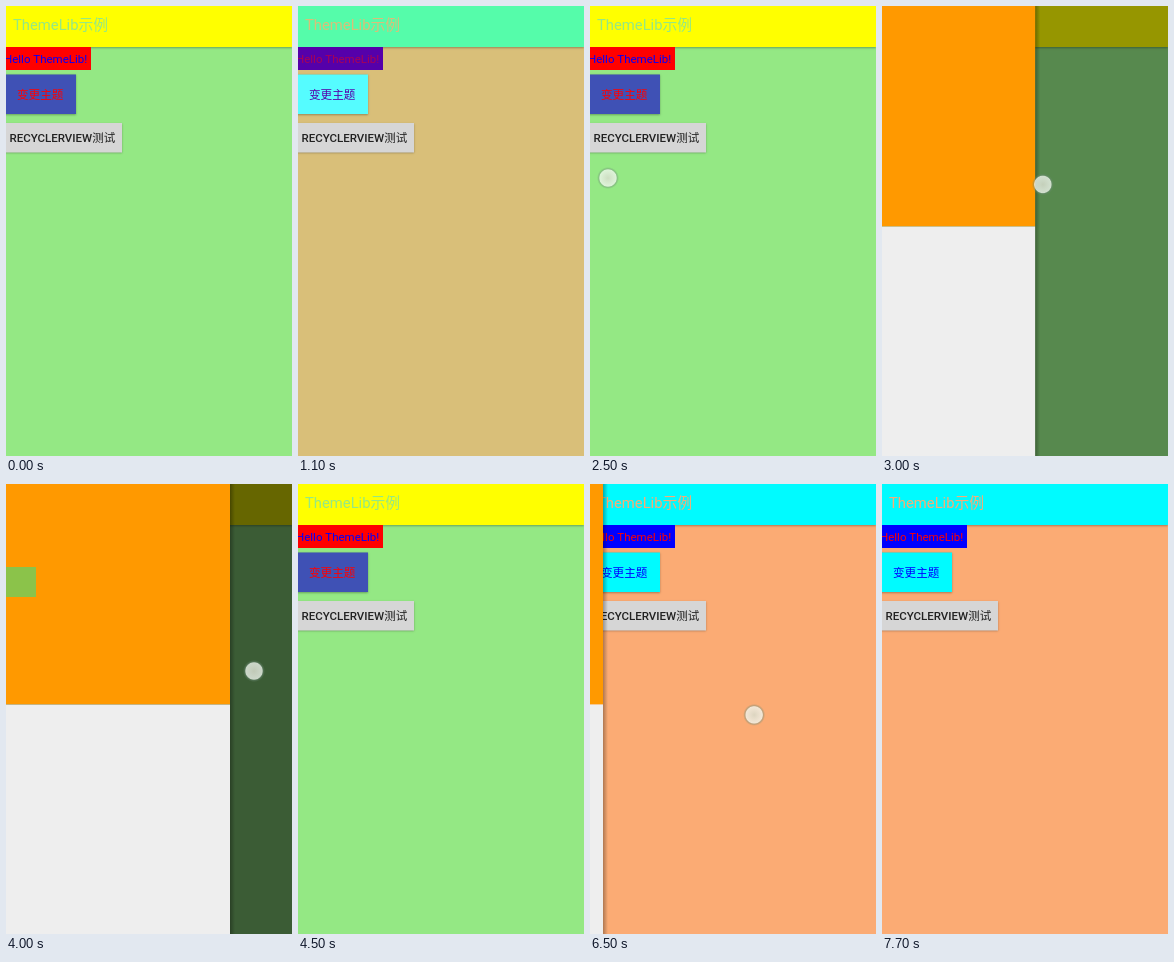
An HTML page with a canvas that plays this animation: 286 px wide and 450 px high, repeating every 8 s.

```html
<!DOCTYPE html>
<html lang="zh">
<head>
<meta charset="utf-8">
<title>ThemeLib</title>
<style>
  html, body { margin: 0; width: 100%; height: 100%; overflow: hidden; }
  canvas { display: block; }
</style>
</head>
<body>
<canvas width="286" height="450"></canvas>
<script>
const ctx = document.querySelector('canvas').getContext('2d');
const W = 286, H = 450, LOOP = 8000, STEP = 100, FADE = 300;
const FONT = 'Roboto, "Noto Sans CJK SC", "Noto Sans CJK", sans-serif';
const RED = '#ff0000', BLUE = '#0000ff';

const green = { bar: '#ffff00', page: '#94e884', label: RED, text: BLUE, button: '#3f51b5' };
const salmon = { bar: '#00fbff', page: '#fbab74', label: BLUE, text: RED, button: '#00fbff' };

// A tap on the theme button, then a fade to the next theme.
const changes = [
  { tap: 700, start: 900, from: green, to: salmon },
  { tap: 1600, start: 1700, from: salmon, to: green },
  { tap: 4900, start: 5100, from: green, to: salmon }
];

const hold = (start, end, x, y) => ({ start, arrive: start + STEP, end, from: [x, y], to: [x, y] });
const touches = [
  ...changes.map(c => hold(c.tap, c.start, 38, 90)),
  { start: 2500, arrive: 3400, end: 3700, from: [18, 172], to: [263, 183] },
  hold(4000, 4100, 248, 187),
  { start: 5900, arrive: 6800, end: 6900, from: [16, 222], to: [216, 234] },
  { start: 7000, arrive: 7200, end: 7500, from: [216, 234], to: [258, 270] }
];

const drawerMoves = [
  { open: 2500, opened: 3300, close: 4100, closed: 4500, width: 224 },
  { open: 5900, opened: 6100, close: 7400, closed: 7700, width: 13 }
];

const mix = (a, b, p) => a + (b - a) * p;
const progress = (t, a, b) => Math.min(1, Math.max(0, (t - a) / (b - a)));
const ease = p => p * p * (3 - 2 * p);

function mixColor(a, b, p) {
  const channel = (hex, i) => parseInt(hex.slice(i, i + 2), 16);
  return `rgb(${[1, 3, 5].map(i => Math.round(mix(channel(a, i), channel(b, i), p)))})`;
}

function themeAt(t) {
  const change = changes.filter(c => t > c.start).pop();
  if (!change) return green;
  const { from, to, start } = change;
  const p = progress(t, start, start + FADE);
  const theme = {};
  for (const part in to) {
    // The button always fades in from white.
    theme[part] = mixColor(part === 'button' ? '#ffffff' : from[part], to[part], p);
  }
  return theme;
}

function rect(x, y, w, h, color) {
  ctx.fillStyle = color;
  ctx.fillRect(x, y, w, h);
}

function raised(x, y, w, h, color) {
  ctx.save();
  ctx.shadowColor = 'rgba(0,0,0,.3)';
  ctx.shadowBlur = 2;
  ctx.shadowOffsetY = 0.5;
  rect(x, y, w, h, color);
  ctx.restore();
}

function text(str, x, y, size, color, weight = 400) {
  ctx.font = `${weight} ${size}px ${FONT}`;
  ctx.fillStyle = color;
  ctx.fillText(str, x, y);
}

function drawPage(theme) {
  rect(0, 0, W, H, theme.page);
  raised(0, 0, W, 41, theme.bar);
  text('ThemeLib示例', 7, 23.5, 14.8, theme.page);
  rect(0, 41, 85, 23, theme.label);
  text('Hello ThemeLib!', -2, 57, 11.5, theme.text);
  raised(-4, 68.5, 74, 39.5, theme.button);
  text('变更主题', 11, 93, 11.6, theme.label, 500);
  raised(-4, 117, 120, 29.5, '#d6d6d6');
  text('RECYCLERVIEW测试', 3.5, 136, 11.5, '#212121', 500);
}

function drawDrawer(t) {
  const move = drawerMoves.find(m => t > m.open && t < m.closed);
  if (!move) return;
  const edge = move.width * (ease(progress(t, move.open, move.opened)) -
                             ease(progress(t, move.close, move.closed)));
  const open = edge / 224;
  if (open > 0.1) rect(0, 0, W, H, `rgba(0,0,0,${0.6 * open})`);
  const shadow = ctx.createLinearGradient(edge, 0, edge + 5, 0);
  shadow.addColorStop(0, 'rgba(0,0,0,.3)');
  shadow.addColorStop(1, 'rgba(0,0,0,0)');
  rect(edge, 0, 5, H, shadow);
  rect(edge - 224, 0, 224, 220.5, '#ff9900');
  rect(edge - 224, 220.5, 224, H, '#eeeeee');
  rect(edge - 224, 83, 30, 30, '#8bc34a');
}

function drawTouch(t) {
  const touch = touches.find(g => t >= g.start && t <= g.end);
  if (!touch) return;
  const p = ease(progress(t, touch.start, touch.arrive));
  const [x, y] = touch.from.map((v, i) => mix(v, touch.to[i], p));
  const glow = ctx.createRadialGradient(x, y, 0, x, y, 11);
  glow.addColorStop(0, 'rgba(215,220,205,.85)');
  glow.addColorStop(0.75, 'rgba(240,245,238,.8)');
  glow.addColorStop(0.85, 'rgba(110,140,120,.4)');
  glow.addColorStop(1, 'rgba(110,140,120,0)');
  rect(x - 11, y - 11, 22, 22, glow);
}

const began = performance.now();

function frame() {
  const elapsed = (performance.now() - began) % LOOP;
  const t = Math.floor(elapsed / STEP) * STEP;
  drawPage(themeAt(t));
  drawDrawer(t);
  drawTouch(t);
  requestAnimationFrame(frame);
}
frame();
</script>
</body>
</html>
```
